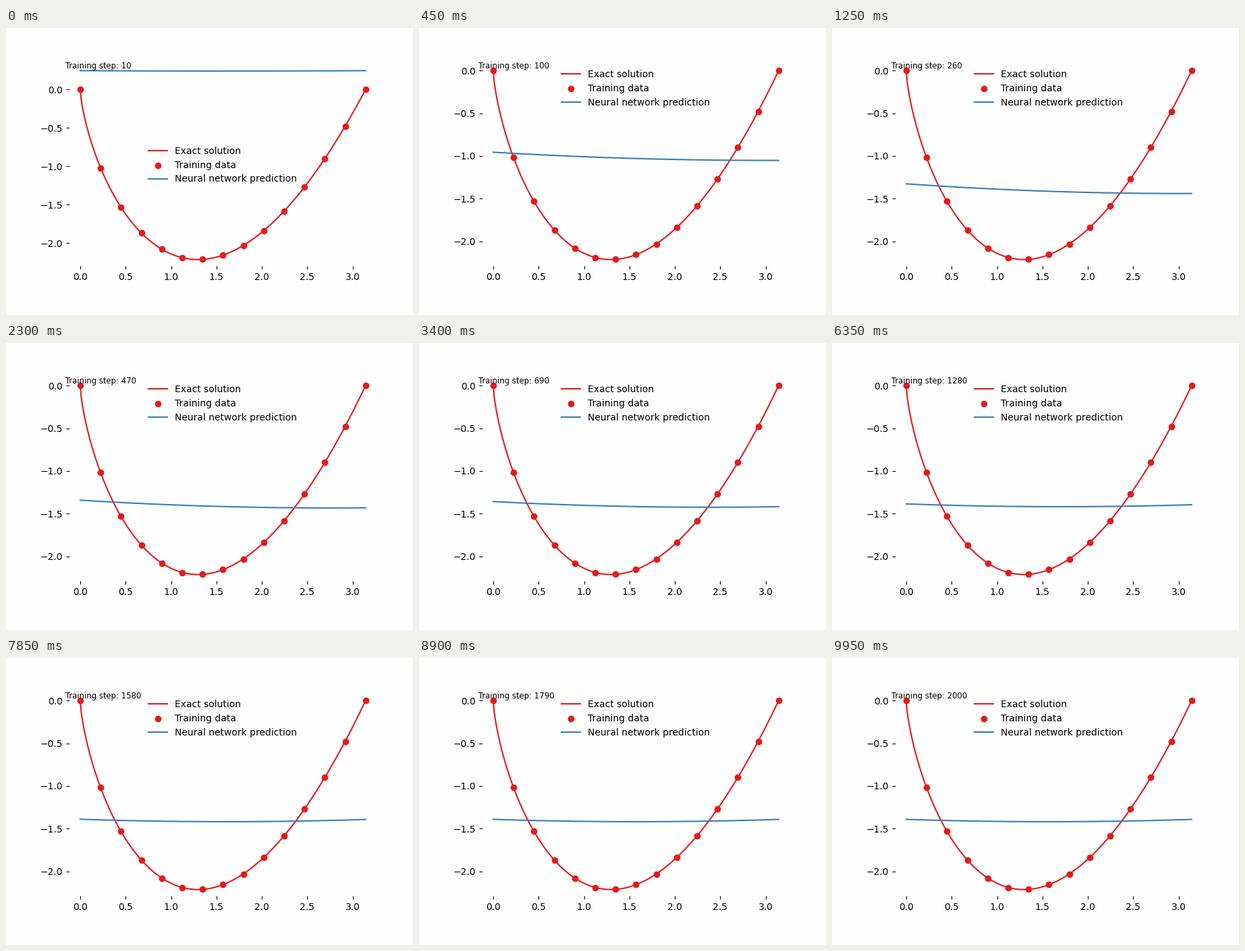
A matplotlib script for the animation above (10000 ms loop, 603x426 px).

```python
import numpy as np
import matplotlib.pyplot as plt
from matplotlib.animation import FuncAnimation

W, H, DPI = 603, 426, 100
FRAMES, INTERVAL = 200, 50
RED, BLUE = "#e41a1c", "#377eb8"


def exact(x):
    return -x ** 0.703 * (np.pi - x)


def prediction(x, step):
    """Flat start that drops to the data mean, then slowly loses its tilt."""
    u = 2 * x / np.pi - 1
    bowl = u ** 2 - 1
    start = 0.245 + 0.005 * bowl
    slow = np.exp(-step / 600)
    ends = -1.3925 + 0.011 * slow
    tilt = -0.0635 * np.exp(-(step / 796) ** 2)
    fitted = ends + tilt * u + (0.027 + 0.006 * slow) * bowl
    fade = np.exp(-((step - 10) / 70) ** 1.5)
    return fade * start + (1 - fade) * fitted


fig = plt.figure(figsize=(W / DPI, H / DPI), dpi=DPI, facecolor="#fefefe")
left, top, width, height = 88.8, 49.3, 465.1, 308.4
ax = fig.add_axes([left / W, 1 - (top + height) / H, width / W, height / H],
                  facecolor="none")
for spine in ax.spines.values():
    spine.set_visible(False)
ax.tick_params(direction="in")

xs = np.linspace(0, np.pi, 300)
xd = np.linspace(0, np.pi, 15)
ys = exact(xs)
ax.plot(xs, ys, color=RED, label="Exact solution")
ax.scatter(xd, exact(xd), color=RED, label="Training data")
net, = ax.plot(xs, prediction(xs, 10), color=BLUE,
               label="Neural network prediction")
ax.set_xlim(-0.05 * np.pi, 1.05 * np.pi)
legend = ax.legend(loc="center", frameon=False)
label = fig.text(88.3 / W, 1 - 60 / H, "", fontsize="small")


def update(i):
    step = 10 * (i + 1)
    y = prediction(xs, step)
    net.set_ydata(y)
    label.set_text(f"Training step: {step}")
    low, high = ys.min(), max(0, y.max())
    pad = 0.05 * (high - low)
    ax.set_ylim(low - pad, high + pad)
    # keep the legend clear of the prediction
    legend.set_loc("center" if y.max() > -0.5 else "upper center")
    return net, label, legend


anim = FuncAnimation(fig, update, frames=FRAMES, interval=INTERVAL,
                     repeat=True, repeat_delay=0, blit=False)
plt.show()
```
